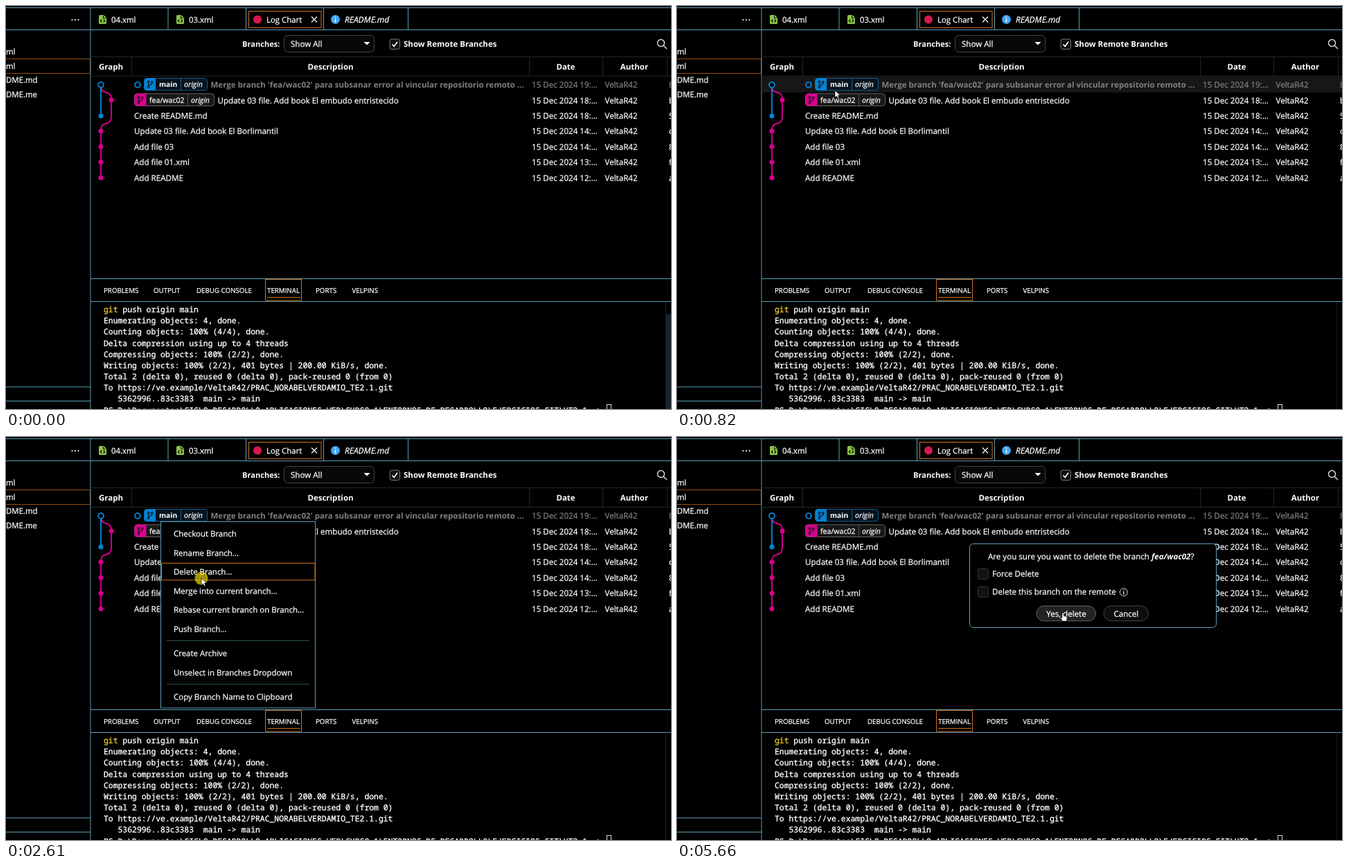
An HTML page that plays this animation: 960 px wide and 583 px high, repeating every 8000 ms.

```html
<!DOCTYPE html>
<html lang="en">
<head>
<meta charset="utf-8">
<title>Deleting a branch</title>
<style>
  html, body { margin: 0; width: 100%; height: 100%; overflow: hidden; background: #000; }
  svg { display: block; width: 960px; height: 583px; }
  text {
    font: 11.6px "Open Sans", "Noto Sans", sans-serif; color: #fff; white-space: pre;
    fill: currentColor; stroke: currentColor; stroke-width: .25; text-rendering: geometricPrecision;
  }
  .b { font-weight: 700; font-size: 11.5px; stroke-width: 0; }
  .i { font-style: italic; }
  .mid { text-anchor: middle; }
  .dim { color: #808080; }
  .tab { font-size: 11.4px; }
  .panel { font-size: 9.75px; }
  .ref { font-size: 10.6px; }
  .item { font-size: 11.48px; }
  #term text { font: 500 11.42px "Noto Sans Mono", "DejaVu Sans Mono", monospace; stroke-width: .35; }
  .edge { fill: none; stroke: #5b9fb6; }
  .focus { fill: none; stroke: #d0731a; }
  .grid { fill: none; stroke: #242424; }
  .blue { fill: #0085d9; }
  .pink { fill: #d9008f; }
  .line { fill: none; stroke-width: 1.9; }
  .box { fill: #111; stroke: #333; }

  .anim { animation: 8s step-end infinite; }
  .toggle { opacity: 0; }
  #slider { animation-name: slider; }
  #row0 { animation-name: row0; }
  #row1 { animation-name: row1; }
  #menu { animation-name: menu; }
  #pick0 { animation-name: pick0; }
  #pick2 { animation-name: pick2; }
  #click { animation-name: click; }
  #dialog { animation-name: dialog; }
  #arrow { animation-name: arrow; }
  #hand { animation-name: hand; }

  @keyframes slider { 0% { opacity: 1 } 3.5% { opacity: .5 } 6%, 100% { opacity: 0 } }
  @keyframes row0 { 0%, 11.125% { opacity: 0 } 8.625% { opacity: 1 } }
  @keyframes row1 { 0%, 16.8% { opacity: 0 } 11.125% { opacity: 1 } }
  @keyframes menu { 0%, 34.25% { opacity: 0 } 16% { opacity: 1 } }
  @keyframes pick0 { 0%, 25.875% { opacity: 0 } 16.8% { opacity: 1 } }
  @keyframes pick2 { 0% { opacity: 0 } 26.75%, 100% { opacity: 1 } }
  @keyframes click { 0%, 34.25% { opacity: 0 } 32.625% { opacity: 1 } }
  @keyframes dialog { 0% { opacity: 0 } 34.25%, 100% { opacity: 1 } }
  @keyframes arrow {
    0% { transform: translate(-50px, -50px) }
    .875% { transform: translate(881px, 553px) }
    1.75% { transform: translate(760px, 482px) }
    2.625% { transform: translate(632px, 388px) }
    3.5% { transform: translate(520px, 300px) }
    4.25% { transform: translate(407px, 206px) }
    5.125% { transform: translate(300px, 112px) }
    6% { transform: translate(240px, 66px) }
    6.875% { transform: translate(232px, 58px) }
    7.75% { transform: translate(223px, 107px) }
    8.625% { transform: translate(226px, 114px) }
    9.5% { transform: translate(228px, 119px) }
    10.25% { transform: translate(228px, 122px) }
    11.125% { transform: translate(227px, 141px) }
    13.5% { transform: translate(226px, 140px) }
    16% { transform: translate(225px, 139px) }
    25.875% { transform: translate(250px, 165px) }
    26.75% { transform: translate(282px, 205px) }
    28.5% { transform: translate(282px, 204px) }
    38.625% { transform: translate(300px, 210px) }
    39.625% { transform: translate(370px, 225px) }
    40.75% { transform: translate(440px, 243px) }
    41.75% { transform: translate(500px, 257px) }
    42.875% { transform: translate(516px, 259px) }
    52.25% { transform: translate(506px, 248px) }
    53.125% { transform: translate(482px, 226px) }
    54% { transform: translate(462px, 208px) }
    54.875% { transform: translate(452px, 200px) }
    55.625% { transform: translate(448px, 198px) }
    56.5% { transform: translate(446px, 196px) }
    59% { transform: translate(-50px, -50px) }
    68.125% { transform: translate(490px, 222px) }
    69% { transform: translate(550px, 244px) }
    69.875%, 100% { transform: translate(-50px, -50px) }
  }
  @keyframes hand {
    0%, 68.125% { transform: translate(-50px, -50px) }
    59% { transform: translate(449px, 197px) }
    67.25% { transform: translate(439px, 197px) }
    69.875% { transform: translate(578px, 252px) }
    70.75%, 100% { transform: translate(557px, 254px) }
  }
</style>
</head>
<body>
<svg viewBox="0 0 960 583" xmlns="http://www.w3.org/2000/svg">
  <defs>
    <g id="xml">
      <path d="M1.5 0H7L11 4V11.5Q11 13 9.5 13H1.5Q0 13 0 11.5V1.5Q0 0 1.5 0Z" fill="#8bc34a"/>
      <path d="M6.5 1V4.5H10" fill="none" stroke="#000"/>
      <path d="M4.3 6.5L2.3 8.5L4.3 10.5M6.7 6.5L8.7 8.5L6.7 10.5" fill="none" stroke="#000" stroke-width="1.1"/>
    </g>
    <g id="fork" fill="none" stroke="#111" stroke-width="1.1">
      <circle cx="-2.5" cy="-3.6" r="1.4"/><circle cx="-2.5" cy="4" r="1.4"/><circle cx="2.7" cy="-3" r="1.4"/>
      <path d="M-2.5 -2.2V2.6M2.7 -1.6Q2.7 1 -2.3 1.4"/>
    </g>
  </defs>

  <!-- Sidebar -->
  <g fill="#fff"><circle cx="95.5" cy="20" r="1.1"/><circle cx="100" cy="20" r="1.1"/><circle cx="104.5" cy="20" r="1.1"/></g>
  <g id="files"></g>
  <path class="focus" d="M0 76.5H121.5V97.5H0" stroke-opacity=".7"/>
  <path class="edge" d="M0 551H122M0 571.5H122"/>

  <!-- Editor tabs -->
  <path class="edge" d="M0 2.5H960M0 34.5H960M122 2.5V583M234 2.5V34.5M346.5 2.5V34.5M458.5 2.5V34.5M580.5 2.5V34.5"/>
  <use href="#xml" x="134" y="13"/><text class="tab" x="152" y="24">04.xml</text>
  <use href="#xml" x="246" y="13"/><text class="tab" x="264" y="24">03.xml</text>
  <rect class="focus" x="350.5" y="7.5" width="104.5" height="24"/>
  <circle cx="363" cy="19.5" r="6" fill="#d3194f"/>
  <text class="tab" x="376" y="24">Log Chart</text>
  <path d="M441 15.5L449 23.5M449 15.5L441 23.5" stroke="#fff" stroke-width="1.2"/>
  <circle cx="475.5" cy="19.5" r="6.5" fill="#42a5f5"/>
  <path d="M475.5 15.5V17M475.5 18.5V23.5" stroke="#fff" stroke-width="1.5"/>
  <text class="i" x="489" y="24" style="font-size:12px">README.md</text>

  <!-- Toolbar -->
  <text class="b" x="341" y="59" style="font-size:11.1px">Branches:</text>
  <rect x="401.5" y="42.5" width="130" height="24" rx="5" fill="#080808" stroke="#444"/>
  <text x="411" y="59">Show All</text>
  <path d="M516.5 52H525.5L521 56.5Z" fill="#fff"/>
  <rect x="554" y="48" width="14.5" height="14.5" rx="3" fill="#111" stroke="#777"/>
  <path d="M557.5 55.5L560.2 58.5L565 51.8" fill="none" stroke="#fff" stroke-width="1.6"/>
  <text class="b" x="574" y="59">Show Remote Branches</text>
  <g fill="none" stroke="#ddd" stroke-width="1.4"><circle cx="945.5" cy="53.5" r="5"/><path d="M949 57L954 62"/></g>

  <!-- Commit table -->
  <path class="grid" d="M122 73.5H960M122 101.5H960M181.5 73.5V101.5M755.5 73.5V101.5M861.5 73.5V101.5M954.5 73.5V101.5"/>
  <g id="heads"></g>
  <rect class="anim toggle" id="row0" x="122.5" y="102.5" width="838" height="22.5" fill="#171717"/>
  <rect class="anim toggle" id="row1" x="122.5" y="125" width="838" height="22.5" fill="#171717"/>
  <path class="line" stroke="#0085d9" d="M137 114V159"/>
  <path class="line" stroke="#d9008f" d="M137 114C137 132 152 118 152 136V159C152 177 137 163 137 181V248.5"/>
  <path class="line" stroke="#0085d9" d="M137 114V122"/>
  <circle cx="137" cy="114" r="3.9" fill="#000" stroke="#0085d9" stroke-width="1.9"/>
  <circle class="blue" cx="137" cy="159" r="3.5"/>
  <g class="pink" id="dots"></g>
  <circle cx="190" cy="114" r="3.9" fill="none" stroke="#0085d9" stroke-width="1.9"/>
  <g id="commits"></g>

  <rect x="199.5" y="104.5" width="91" height="17.5" rx="4" fill="#07131c" stroke="#12618f"/>
  <path class="blue" d="M216 104.5V122H203.5Q199.5 122 199.5 118V108.5Q199.5 104.5 203.5 104.5Z"/>
  <use href="#fork" x="208" y="113.3"/>
  <path d="M252.5 105V122" stroke="#12618f"/>
  <text class="b" x="221" y="117.3" style="font-size:10.3px">main</text>
  <text class="i ref" x="257" y="117.3">origin</text>

  <rect x="185.5" y="126.8" width="115" height="17.7" rx="4" fill="#181818" stroke="#666"/>
  <path class="pink" d="M202.5 126.8V144.5H189.5Q185.5 144.5 185.5 140.5V130.8Q185.5 126.8 189.5 126.8Z"/>
  <use href="#fork" x="194" y="135.7"/>
  <path d="M262.5 127V144.5" stroke="#555"/>
  <text class="ref" x="207" y="139.6">fea/wac02</text>
  <text class="i ref" x="267" y="139.6">origin</text>

  <!-- Terminal panel -->
  <path class="edge" d="M122 394.5H960M122 427.5H960"/>
  <g id="panels"></g>
  <rect class="focus" x="374.5" y="395.5" width="52" height="30.5"/>
  <path class="focus" d="M377 421.5H425"/>
  <g id="term"></g>
  <rect x="867.5" y="576.5" width="6" height="14" fill="none" stroke="#ddd"/>
  <path d="M952.5 428V583" stroke="#1c1c1c"/>
  <rect class="anim" id="slider" x="953" y="446" width="7" height="137" fill="#18252b"/>

  <!-- Context menu -->
  <g class="anim toggle" id="menu">
    <rect x="223.5" y="122.5" width="223" height="269.5" fill="#000" stroke="#5b9fb6"/>
    <path d="M232 294.5H438M232 357.5H438" stroke="#2c4c55"/>
    <rect class="focus anim toggle" id="pick0" x="224.5" y="127.5" width="221.5" height="24.5"/>
    <rect class="focus anim toggle" id="pick2" x="224.5" y="182.5" width="221.5" height="24.5"/>
    <g id="items"></g>
  </g>

  <!-- Confirmation -->
  <g class="anim toggle" id="dialog">
    <rect x="422.5" y="154.5" width="356" height="121" rx="5" fill="#000" stroke="#5b9fb6"/>
    <text x="449" y="177">Are you sure you want to delete the branch <tspan class="b i">fea/wac02</tspan>?</text>
    <rect class="box" x="434.5" y="190.5" width="15" height="15" rx="2"/>
    <text x="455" y="202">Force Delete</text>
    <rect class="box" x="434.5" y="216.5" width="15" height="15" rx="2"/>
    <text x="455" y="228">Delete this branch on the remote</text>
    <circle cx="644.8" cy="224.5" r="5.5" fill="none" stroke="#ddd"/>
    <path d="M644.8 221V222.3M644.8 223.3V228" stroke="#ddd" stroke-width="1.3"/>
    <rect x="519" y="244.5" width="85.5" height="21.5" rx="10.7" fill="#222" stroke="#666"/>
    <text class="mid" x="562" y="259.5">Yes, delete</text>
    <rect x="616" y="244.5" width="64.5" height="21.5" rx="10.7" fill="#0d0d0d" stroke="#444"/>
    <text class="mid" x="648.3" y="259.5">Cancel</text>
  </g>

  <!-- Pointer -->
  <circle class="anim toggle" id="click" cx="282" cy="204.5" r="9.5" fill="#e2d600" fill-opacity=".7"/>
  <g fill="#fff" stroke="#000" stroke-width=".7">
    <path class="anim" id="arrow" d="M0 0V10.5L2.5 8.3L4.2 12L6 11.2L4.4 7.5H7.6Z"/>
    <path class="anim" id="hand" d="M-1.2 .8Q0 -.7 1.2 .8V4.8L5 5.6Q6.6 6 6.2 8L5.4 12.5H-.2L-3.5 8Q-3 6.2 -1.2 7.7Z"/>
  </g>
</svg>

<script>
  const byId = id => document.getElementById(id);

  function add(parent, tag, attrs, content = '') {
    const el = document.createElementNS('http://www.w3.org/2000/svg', tag);
    for (const key in attrs) el.setAttribute(key, attrs[key]);
    el.textContent = content;
    byId(parent).appendChild(el);
    return el;
  }
  const label = (parent, x, y, content, cls = '') => add(parent, 'text', { x, y, class: cls }, content);

  ['ml', 'ml', 'DME.md', 'DME.me'].forEach((name, i) => label('files', 0, 70 + i * 20.7, name, 'tab'));

  [[151.5, 'Graph'], [468.5, 'Description'], [808, 'Date'], [907, 'Author']]
    .forEach(([x, name]) => label('heads', x, 92, name, 'b mid'));

  [[152, 136], [137, 181], [137, 203.5], [137, 226], [137, 248.5]]
    .forEach(([cx, cy]) => add('dots', 'circle', { cx, cy, r: 3.5 }));

  const commits = [
    [295.5, "Merge branch 'fea/wac02' para subsanar error al vincular repositorio remoto ...", 19, '8'],
    [305.5, 'Update 03 file. Add book El embudo entristecido', 18, 'b'],
    [185, 'Create README.md', 18, '5'],
    [185, 'Update 03 file. Add book El Borlimantil', 14, 'c'],
    [185, 'Add file 03', 14, '8'],
    [185, 'Add file 01.xml', 13, 'f'],
    [185, 'Add README', 12, 'a']
  ];
  commits.forEach(([x, message, hour, hash], i) => {
    const y = 118.2 + i * 22.4;
    const tone = i ? '' : 'dim';
    label('commits', x, y, message, i ? '' : 'b dim');
    label('commits', 759, y, `15 Dec 2024 ${hour}:...`, tone);
    label('commits', 864.5, y, 'VeltaR42', tone);
    label('commits', 957, y, hash, tone);
  });

  [[141, 'PROBLEMS'], [213, 'OUTPUT'], [275, 'DEBUG CONSOLE'], [377, 'TERMINAL'], [447, 'PORTS'], [499.5, 'VELPINS']]
    .forEach(([x, name]) => label('panels', x, 414.7, name, 'panel'));

  const output = [
    '    push origin main',
    'Enumerating objects: 4, done.',
    'Counting objects: 100% (4/4), done.',
    'Delta compression using up to 4 threads',
    'Compressing objects: 100% (2/2), done.',
    'Writing objects: 100% (2/2), 401 bytes | 200.00 KiB/s, done.',
    'Total 2 (delta 0), reused 0 (delta 0), pack-reused 0 (from 0)',
    'To https://ve.example/VeltaR42/PRAC_NORABELVERDAMIO_TE2.1.git',
    '   5362996..83c3383  main -> main',
    String.raw`PS D:\Documentos\CICLO DESARROLLO APLICACIONES WEB\CURSO 1\ENTORNOS DE DESARROLLO\EJERCICIOS GIT\UT2.1 =>`
  ];
  output.forEach((row, i) => label('term', 141, 443 + i * 16.18, row));
  label('term', 141, 443, 'git').style.color = '#e8c424';

  const items = [
    [140, 'Checkout Branch'], [167.5, 'Rename Branch...'], [195, 'Delete Branch...'],
    [222.5, 'Merge into current branch...'], [250, 'Rebase current branch on Branch...'],
    [277.5, 'Push Branch...'], [312.8, 'Create Archive'],
    [340.2, 'Unselect in Branches Dropdown'], [375.7, 'Copy Branch Name to Clipboard']
  ];
  items.forEach(([y, name]) => label('items', 242, y + 4.3, name, 'item'));
</script>
</body>
</html>
```
